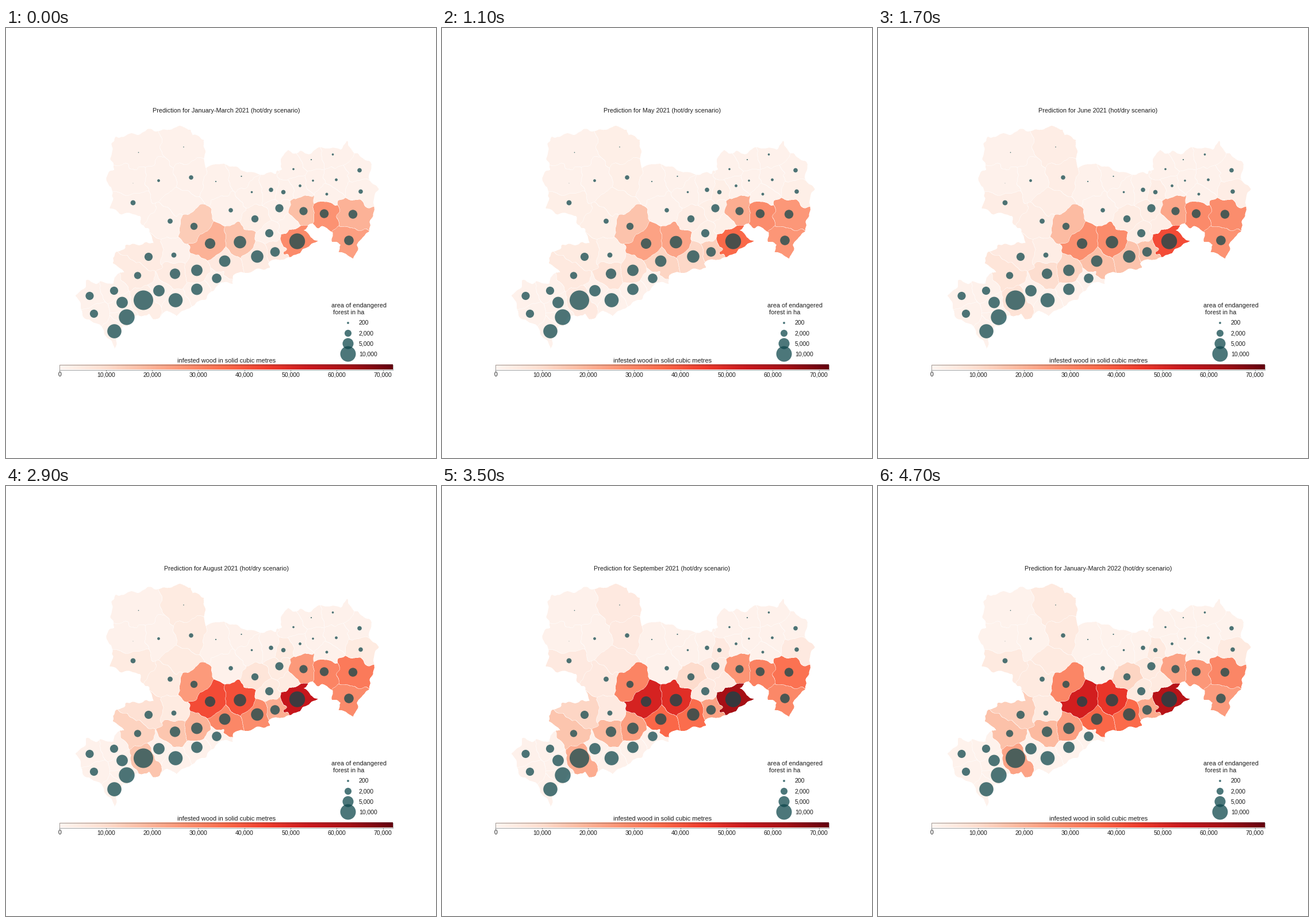
Animation, 748 px wide and 748 px high, one loop 6700 ms. Source, as a matplotlib script:

```python
import numpy as np
import matplotlib.pyplot as plt
from matplotlib.animation import FuncAnimation
from matplotlib.patches import Circle, Rectangle
from matplotlib.path import Path

SIZE, DPI, STEP, LOOP = 748, 100, 100, 6700
PX = 72 / DPI
REDS = plt.get_cmap("Reds")
TEAL = (14 / 255, 71 / 255, 76 / 255)
TOP = 72.2  # thousand cubic metres at the end of the scale
MAP_BOX = 112, 656, 164, 568  # left, right, top, bottom
SUB = 2  # samples per pixel side

PERIODS = ["January-March 2021", "April 2021", "May 2021", "June 2021", "July 2021",
           "August 2021", "September 2021", "October-December 2021", "January-March 2022"]
PEAK = 7  # period with the highest values
FADE = 0.83  # what is left of them in the last period

NORTH_BORDER = [
    (177, 262), (186, 250), (182, 205), (197, 189), (236, 181), (270, 177), (290, 172), (318, 177),
    (326, 188), (345, 195), (346, 242), (377, 235), (408, 247), (440, 257), (478, 249), (480, 229),
    (490, 214), (520, 217), (548, 209), (583, 210), (592, 199), (603, 214), (634, 236), (633, 265),
    (645, 280), (641, 300), (632, 348), (614, 373), (606, 400), (577, 390), (583, 376), (570, 370),
    (568, 356), (533, 339), (517, 352), (541, 372), (515, 382), (511, 392)]
SOUTH_BORDER = [
    (486, 400), (456, 408), (456, 419), (398, 428), (392, 444), (372, 445), (345, 471), (313, 490),
    (297, 502), (285, 491), (257, 504), (227, 497), (205, 520), (191, 545), (190, 560), (178, 540),
    (160, 515), (135, 506), (134, 490), (122, 465), (143, 442), (187, 443), (188, 432), (206, 424),
    (185, 410), (187, 396), (213, 378), (258, 373), (247, 352), (230, 325), (180, 316), (188, 298)]

# dot radius -> district centres
CALM = {0.4: [(221, 270)], 0.8: [(230.5, 216.5)], 1.1: [(365, 267), (409.5, 258), (531, 229)],
        1.8: [(427.5, 285.5), (500, 245.5), (534, 265.5), (568.5, 220)],
        2.4: [(265.5, 265.5), (511.5, 274.5), (574.5, 264), (558, 289)],
        3.8: [(461, 281.5), (391, 317), (615, 247.5)],
        7.1: [(188, 457), (145.5, 466), (153, 497)], 8.3: [(366.5, 435.5)],
        9.9: [(202, 477.5), (266, 457), (332, 454.5)],
        12.3: [(188.5, 527.5), (295, 473.5)], 13.7: [(210, 503)]}
MILD = {0: [(303, 308), (494, 342)], 0.8: [(309, 207)],
        3.8: [(322, 260), (482.5, 285.5), (617, 284.5)],
        4.4: [(221, 304), (285.5, 336), (292, 395)], 7.1: [(475.5, 313.5), (458, 357)]}
# growth exponent -> x, y, dot radius, first value, peak value
HOT = {0.8: [(468, 389.5, 8.3, 5, 26), (517.5, 318.5, 7.1, 17, 28),
             (603.5, 324, 7.7, 20, 36), (596.5, 369.5, 8.3, 24, 30), (553.5, 323, 7.7, 27, 31)],
       1.4: [(506.5, 371, 13.7, 29, 71), (407, 372.5, 10.8, 16, 56), (437, 397.5, 10.8, 4, 43),
             (380.5, 405.5, 9.9, 5, 44), (332, 421.5, 9.9, 4, 29), (294, 427.5, 9.1, 4, 22)],
       2: [(355, 375, 9.1, 20, 63), (327, 345, 6.2, 14, 36), (229, 430.5, 6.2, 4, 20),
           (239, 473.5, 17, 3, 28)],
       3: [(433, 332, 6.2, 3, 14), (248, 398, 7.1, 4, 16)]}

districts = [(x, y, r, 1.5, 1.5, 1) for r, spots in CALM.items() for x, y in spots]
districts += [(x, y, r, 1.5, 5.5, 1) for r, spots in MILD.items() for x, y in spots]
districts += [(*entry, power) for power, entries in HOT.items() for entry in entries]


def wobble(x, y, rng):
    """Sum of random plane waves that makes borders jagged."""
    total = np.zeros_like(x)
    for _ in range(30):
        wave, angle, phase = rng.uniform((7, 0, 0), (36, np.pi, 2 * np.pi))
        along = x * np.float32(np.cos(angle)) + y * np.float32(np.sin(angle))
        total += np.float32(0.02 * wave) * np.sin(along * np.float32(2 * np.pi / wave) + np.float32(phase))
    return total


def label_districts():
    """Nearest district of each sample; -1 marks borders and the outside."""
    left, right, top, bottom = MAP_BOX
    x, y = np.meshgrid(np.arange(left, right, 1 / SUB, dtype=np.float32) + 0.5 / SUB,
                       np.arange(top, bottom, 1 / SUB, dtype=np.float32) + 0.5 / SUB)
    rng = np.random.default_rng(4)
    wx, wy = x + wobble(x, y, rng), y + wobble(x, y, rng)
    best = np.full(x.shape, np.inf, dtype=np.float32)
    owner = np.zeros(x.shape, dtype=int)
    for k, (cx, cy, _, _, peak, _) in enumerate(districts):
        reach = (wx - cx) ** 2 + (wy - cy) ** 2 - 8 * peak  # hotter districts are larger
        nearer = reach < best
        best[nearer], owner[nearer] = reach[nearer], k
    inside = Path(NORTH_BORDER + SOUTH_BORDER).contains_points(np.c_[wx.ravel(), wy.ravel()])
    border = (owner != np.roll(owner, 1, 0)) | (owner != np.roll(owner, 1, 1))
    return np.where(inside.reshape(x.shape) & ~border, owner, -1)


def wood(first, peak, power, period):
    if period > PEAK:
        return peak * FADE
    return first + (peak - first) * (period / PEAK) ** power


def paint(labels, period):
    values = np.array([wood(*d[3:], period) for d in districts])
    palette = np.vstack([REDS(values / TOP)[:, :3], [1, 1, 1]])
    h, w = labels.shape
    return palette[labels].reshape(h // SUB, SUB, w // SUB, SUB, 3).mean(axis=(1, 3))


def dot(x, y, radius):
    ax.add_patch(Circle((x, y), radius, fc=TEAL, alpha=0.74, lw=0, zorder=3))


def label(x, y, text, size=10.9, ha="left"):
    return ax.text(x, y, text, fontsize=size * PX, ha=ha, va="baseline", color="#1c1c1c", zorder=4)


plt.rcParams["font.family"] = "Liberation Sans"
fig = plt.figure(figsize=(SIZE / DPI, SIZE / DPI), dpi=DPI, facecolor="white")
ax = fig.add_axes([0, 0, 1, 1])
ax.set_xlim(0, SIZE)
ax.set_ylim(SIZE, 0)
ax.autoscale(False)
ax.axis("off")

labels = label_districts()
maps = [paint(labels, p) for p in range(len(PERIODS))]
left, right, top, bottom = MAP_BOX
picture = ax.imshow(maps[0], extent=(left, right, bottom, top), aspect="auto", interpolation="nearest")
for x, y, radius, *_ in districts:
    dot(x, y, radius)

# size legend
label(566, 486, "area of endangered")
label(569, 497.5, "forest in ha")
for k, hectares in enumerate([200, 2000, 5000, 10000]):
    dot(595, 513 + 18 * k, 0.135 * hectares ** 0.5)
    label(614, 516.5 + 18 * k, f"{hectares:,}", 10.5)

# colour scale
LEFT, RIGHT, UPPER, LOWER = 93.5, 673.5, 585.5, 594.5
ax.imshow(np.linspace(0, 1, 256)[None], cmap=REDS, extent=(LEFT, RIGHT, LOWER, UPPER), aspect="auto")
ax.add_patch(Rectangle((LEFT, UPPER), RIGHT - LEFT, LOWER - UPPER, fill=False, ec="#444444", lw=0.5 * PX))
for k in range(8):
    x = LEFT + k * 10 / TOP * (RIGHT - LEFT)
    ax.plot([x, x], [LOWER, LOWER + 2.5], color="#444444", lw=0.6 * PX)
    label(x, 606, f"{k * 10000:,}", 10.5, "center")
label(383.5, 582, "infested wood in solid cubic metres", 11, "center")
title = label(383, 147, "", ha="center")


def update(frame):
    # the first period is shorter than the others, the last one stays
    period = min((frame * STEP + 100) // 600, len(PERIODS) - 1)
    title.set_text(f"Prediction for {PERIODS[period]} (hot/dry scenario)")
    picture.set_data(maps[period])
    return [title, picture]


anim = FuncAnimation(fig, update, frames=LOOP // STEP, interval=STEP, repeat=True, repeat_delay=0, blit=False)
plt.show()
```
